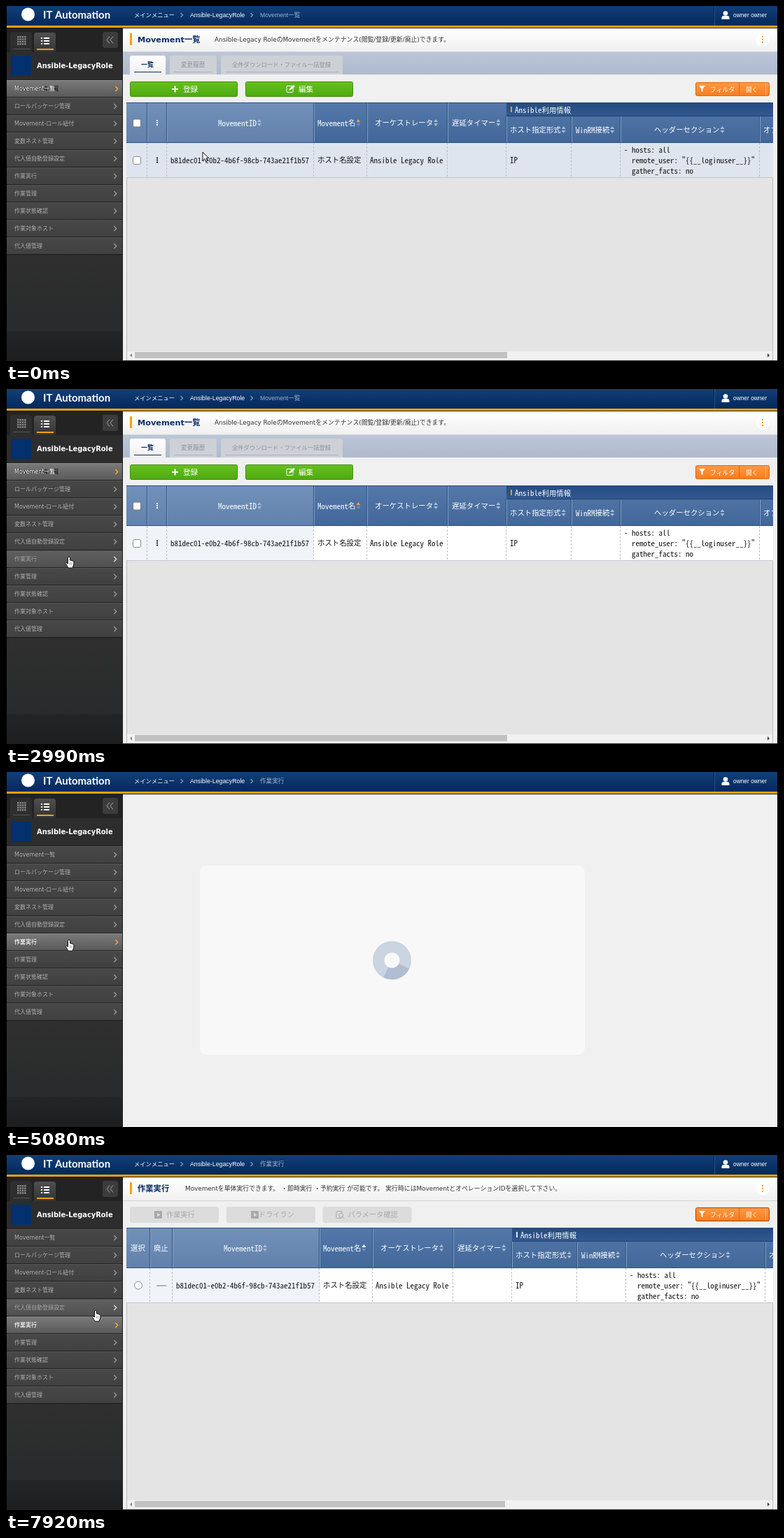
Animation, 1103 px wide and 508 px high, one loop 8 s. Source, as an HTML page with a canvas:

```html
<!DOCTYPE html>
<html lang="ja">
<head>
<meta charset="utf-8">
<title>IT Automation</title>
<style>
html, body { margin: 0; width: 100%; height: 100%; overflow: hidden; background: #000; }
canvas { display: block; }
</style>
</head>
<body>
<canvas id="stage" width="1103" height="508"></canvas>
<script>
const ctx = document.getElementById('stage').getContext('2d');
const LOOP = 8000;
const CJK = '"Noto Sans CJK JP", "Noto Sans CJK", sans-serif';
const UI = '"DejaVu Sans", ' + CJK;
const ARIAL = '"Liberation Sans", ' + CJK;
const MONO = '"Noto Sans Mono CJK JP", "Noto Sans CJK JP", monospace';
const MENU = ['Movement一覧', 'ロールパッケージ管理', 'Movement-ロール紐付', '変数ネスト管理', '代入値自動登録設定',
  '作業実行', '作業管理', '作業状態確認', '作業対象ホスト', '代入値管理'];

// Pointer path: time, x, y
const PATH = [[0, 281, 209], [70, 281, 209], [300, 150, 88], [530, 94, 186], [810, 94, 190], [880, 93, 194],
  [1050, 93, 209], [1610, 93, 209], [1890, 93, 229], [2290, 93, 229], [2360, 90, 240], [2659, 90, 240],
  [2660, 87, 232], [2989, 87, 232], [2990, 90, 240], [7800, 90, 240], [7920, 128, 222], [LOOP, 128, 222]];

function rect(x, y, w, h, fill) {
  ctx.fillStyle = fill;
  ctx.fillRect(x, y, w, h);
}

function box(x, y, w, h, r, fill, stroke) {
  ctx.beginPath();
  ctx.roundRect(x, y, w, h, r);
  paint(fill, stroke);
}

function circle(x, y, r, fill, stroke) {
  ctx.beginPath();
  ctx.arc(x, y, r, 0, 7);
  paint(fill, stroke);
}

function poly(x, y, points, fill, stroke, open) {
  ctx.beginPath();
  for (let i = 0; i < points.length; i += 2) ctx.lineTo(x + points[i], y + points[i + 1]);
  if (!open) ctx.closePath();
  paint(fill, stroke);
}

function paint(fill, stroke) {
  if (fill) { ctx.fillStyle = fill; ctx.fill(); }
  if (stroke) { ctx.strokeStyle = stroke; ctx.stroke(); }
}

function shade(y, h, ...colors) {
  const g = ctx.createLinearGradient(0, y, 0, y + h);
  colors.forEach((c, i) => g.addColorStop(i / (colors.length - 1), c));
  return g;
}

// y is the vertical middle of the glyphs
function text(s, x, y, size, color, family = UI, weight = 400) {
  ctx.font = `${weight} ${size}px ${family}`;
  ctx.fillStyle = color;
  ctx.fillText(s, x, y + size * 0.37);
}

// Fixed-pitch text whose kana and kanji are a little smaller than its Latin letters
function mono(s, x, y, color) {
  for (const run of s.match(/[ -~]+|[^ -~]+/g)) {
    text(run, x, y, run < '\x7f' ? 11 : 10.4, color, MONO);
    x += ctx.measureText(run).width;
  }
  return x;
}

function chevron(x, y, color, size = 3) {
  ctx.lineWidth = 1.4;
  poly(x, y, [-size / 2, -size, size / 2, 0, -size / 2, size], null, color, true);
  ctx.lineWidth = 1;
}

function dots(x, y, color, gap) {
  for (const i of [-1, 0, 1]) rect(x - 1, y - 1 + i * gap, 2, 2, color);
}

function header(page) {
  rect(1, 0, 1101, 28, shade(0, 28, '#123f78', '#03295c'));
  rect(1, 28, 1101, 3, '#f5a20a');
  rect(1, 31, 1101, 1, '#1c1c1c');
  circle(31.5, 12, 9.5, '#fff');
  text('IT Automation', 53, 12.5, 14.9, '#fff', 'Lato, sans-serif', 700);
  text('メインメニュー', 183, 13, 8.3, '#fff', CJK);
  chevron(251, 13, '#8298b6');
  text('Ansible-LegacyRole', 263, 13, 8.8, '#fff', ARIAL);
  chevron(351, 13, '#8298b6');
  text(page, 363, 13, 8.6, '#9fb0c8', ARIAL);
  rect(1011, 0, 1, 28, '#07224a');
  rect(1012, 0, 1, 28, '#2b5489');
  circle(1028, 10.5, 3.3, '#fff');
  box(1022.5, 14, 11, 5, [3, 3, 0, 0], '#fff');
  text('owner owner', 1039, 13, 8.4, '#fff', ARIAL);
}

function sidebar(active, hover) {
  rect(1, 32, 165, 476, '#2d2d2d');
  rect(1, 32, 165, 34, '#232323');
  rect(1, 357, 165, 108, shade(357, 108, '#2f2f2f', '#292a2b'));
  rect(1, 465, 165, 43, shade(465, 43, '#232527', '#1c1e20'));
  box(6, 37, 31, 29, [4, 4, 0, 0], '#2e2e2e');
  box(40, 38, 31, 28, [4, 4, 0, 0], shade(38, 28, '#505050', '#333'));
  box(138, 37, 22, 23, 3, '#3c3c3c');
  ctx.lineWidth = 1;
  for (let i = 0; i < 4; i++) for (let j = 0; j < 4; j++) rect(16 + i * 3.4, 43 + j * 3.4, 2.4, 2.4, '#8a8a8a');
  for (let i = 0; i < 3; i++) {
    rect(50, 45 + i * 4, 2, 2, '#fff');
    rect(54, 45 + i * 4, 8, 2, '#fff');
  }
  rect(10, 61, 24, 1, '#555');
  rect(44, 61, 24, 2, '#f5a20a');
  for (const x of [0, 5]) poly(144 + x, 48.5, [4, -5, 0, 0, 4, 5], null, '#aaa', true);
  rect(7, 71, 29, 29, '#03306e');
  text('Ansible-LegacyRole', 44, 85, 9.9, '#fff', UI, 700);

  MENU.forEach((name, i) => {
    const y = 106 + i * 25, on = i === active, over = i === hover;
    rect(1, y, 165, 25, on ? shade(y, 25, '#7b7b7b', '#585858')
      : over ? shade(y, 25, '#606060', '#505050') : shade(y, 25, '#484848', '#404040'));
    rect(1, y - 1, 165, 1, '#222');
    rect(1, y, 165, 1, on ? '#8a8a8a' : '#555');
    text(name, 12, y + 12.5, 8, '#222', UI, on ? 700 : 400);
    text(name, 12, y + 12, 8, on ? '#fff' : '#bdbdbd', UI, on && i ? 700 : 400);
    chevron(on ? 158 : 156, y + 12.5, on ? '#f5b02a' : over ? '#ddd' : '#999', 3.5);
  });
  rect(1, 355, 165, 1, '#1c1c1c');
  rect(166, 32, 1, 476, '#1c1c1c');
}

function titleBar(title, note, noteX) {
  rect(167, 32, 935, 33, shade(32, 33, '#fff', '#f0f0f0'));
  rect(167, 65, 935, 1, '#d4d4d4');
  rect(177, 39, 3, 17, '#f5a20a');
  text(title, 188, 47.5, 11.3, '#0a2d63', UI, 700);
  text(note, noteX, 47.5, 8.85, '#333');
  circle(1081, 48, 10, '#fff');
  dots(1081, 48, '#f0960a', 4);
}

function filterButton(y, edge) {
  box(985.5, y + 0.5, 105, 19, 2, shade(y, 20, '#ff9a45', '#f97c1c'), edge);
  rect(1047, y + 1, 1, 18, '#d96a14');
  rect(1085, y + 1, 1, 18, '#ffb070');
  poly(990, y + 5, [0, 0, 9, 0, 5.5, 4.5, 5.5, 9, 3.5, 8, 3.5, 4.5], '#fff');
  text('フィルタ', 1006, y + 10.5, 8.8, '#fff', CJK);
  text('開く', 1057, y + 10.5, 8.6, '#fff', CJK);
}

function tab(x, w, label, size, on) {
  box(x, 71, w, 27, [3, 3, 0, 0], on ? shade(71, 27, '#fff', '#f0f0f0') : '#cdd0d5');
  text(label, x + 16, 83.5, size, on ? '#0a2d63' : '#8d929b', CJK, on ? 700 : 400);
  rect(x + 6, 94, w - 12, 1, on ? '#0a2d63' : '#a9b2c2');
}

function greenButton(x, label) {
  box(x + 0.5, 108.5, 153, 21, 2, shade(108, 22, '#67c01f', '#4caa10'), '#3f8f0d');
  text(label, x + 76, 119.5, 10.6, '#fff', CJK);
}

function grayButton(x, label) {
  box(x, 74, 127, 23, 3, '#dcdcdc');
  text(label, x + (label.length > 5 ? 36 : label.length > 4 ? 46 : 52), 85.5, 10.2, '#a9a9a9', CJK);
  const ix = x + (label.length > 5 ? 19 : 35);
  if (label.length > 5) {
    box(ix + 0.5, 80.5, 8, 10, 1, null, '#a9a9a9');
    circle(ix + 7, 86, 3, '#dcdcdc', '#a9a9a9');
    poly(ix + 9, 88, [0, 0, 3, 3], null, '#a9a9a9', true);
  } else {
    box(ix, 80, 11, 11, 1, '#a9a9a9');
    poly(ix + 4, 82.5, [0, 0, 4.5, 3, 0, 6], '#dcdcdc');
  }
}

function sortIcon(x, y, up) {
  poly(x, y - 1, [-3, 0, 0, -4, 3, 0], up || '#a9bad2');
  poly(x, y + 1, [-3, 0, 0, 4, 3, 0], up ? '#7790b5' : '#a9bad2');
}

function panel(y) {
  rect(172, y, 924, 508 - y, '#e4e4e4');
  ctx.strokeStyle = '#bbb';
  ctx.strokeRect(172.5, y + 0.5, 923, 520);
}

function table(y, dx, selectable, hovered) {
  panel(y);
  ctx.save();
  ctx.beginPath();
  ctx.rect(172, y, 924, 508 - y);
  ctx.clip();
  const edges = [172, selectable ? 206 : 202, ...[230, 440, 516, 631, 715, 808, 878, 1077, 1180].map(x => x + dx)];
  const rowY = y + 58, mid = rowY + 24.5, lowMid = y + 39, headMid = y + 29;
  for (let i = 0; i < 10; i++) {
    const x = edges[i], w = edges[i + 1] - x, top = i > 5 ? y + 20 : y;
    rect(x, top, w, rowY - top, i < 3 ? shade(y, 58, '#7291b9', '#6181ac') : shade(y, 58, '#5478aa', '#426799'));
    rect(x, rowY, w, 49, hovered ? '#dfe5ee' : i < 3 ? '#f0f3f8' : '#fff');
    if (i) {
      rect(x - 1, top, 1, rowY - top, '#2f5285');
      rect(x, top, 1, rowY - top, '#86a1c4');
      ctx.setLineDash([3, 2]);
      poly(x - 0.5, rowY, [0, 0, 0, 49], null, '#b9bec6', true);
      ctx.setLineDash([]);
    }
  }
  rect(edges[6], y, 400, 20, shade(y, 20, '#244a80', '#335a90'));
  rect(edges[6], y + 19, 400, 1, '#1f3f70');
  rect(172, rowY - 1, 924, 1, '#2f5285');
  rect(172, rowY + 49, 924, 1, '#c2c6cc');
  rect(172, y, 924, 1, '#2b4c7c');

  rect(721 + dx, y + 6, 2, 8, selectable ? '#dfe7f2' : '#f5a20a');
  mono('Ansible利用情報', 727 + dx, y + 11, '#fff');
  const heads = [['MovementID', 303], ['Movement名', 445], ['オーケストレータ', 527], ['遅延タイマー', 637],
    ['ホスト指定形式', 720], ['WinRM接続', 814], ['ヘッダーセクション', 926], ['オプション', 1082]];
  heads.forEach(([label, x], i) => {
    const cy = i > 3 ? lowMid : headMid;
    const end = mono(label, x + dx, cy + 0.5, '#fff');
    sortIcon(end + 4, cy, i === 1 && (selectable ? '#fff' : '#ff9a45'));
  });

  if (selectable) {
    mono('選択', 178, headMid + 0.5, '#fff');
    mono('廃止', 211, headMid + 0.5, '#fff');
    circle(189, mid, 5.5, '#fff', '#888');
    rect(215, mid, 14, 1, '#777');
  } else {
    box(181.5, headMid - 5, 11, 11, 2, '#fff', '#777');
    box(181.5, mid - 5, 11, 11, 2, '#fff', '#888');
    dots(216, headMid, '#fff', 3);
    dots(216, mid, '#222', 3);
  }
  const cells = [['b81dec01-e0b2-4b6f-98cb-743ae21f1b57', 235], ['ホスト名設定', 445], ['Ansible Legacy Role', 520], ['IP', 720]];
  for (const [value, x] of cells) mono(value, x + dx, mid, '#111');
  ['- hosts: all', '  remote_user: "{{__loginuser__}}"', '  gather_facts: no']
    .forEach((line, i) => mono(line, 883 + dx, mid + (i - 1) * 15, '#111'));

  rect(173, 494, 922, 12, '#f1f1f1');
  rect(184, 495, selectable ? 529 : 532, 9, '#c1c1c1');
  poly(177, 500, [0, 0, 3, -3, 3, 3], '#888');
  poly(1091, 500, [0, 0, -3, -3, -3, 3], '#444');
  ctx.restore();
  rect(167, 507, 935, 1, '#333');
}

function listPage(hovered) {
  titleBar('Movement一覧', 'Ansible-Legacy RoleのMovementをメンテナンス(閲覧/登録/更新/廃止)できます。', 298);
  rect(167, 66, 935, 32, shade(66, 32, '#bcc6d7', '#aebacd'));
  tab(177, 51, '一覧', 9, true);
  tab(234, 67, '変更履歴', 8.6);
  tab(307, 174, '全件ダウンロード・ファイル一括登録', 8.3);
  greenButton(177, '登録');
  rect(237, 118, 9, 2, '#fff');
  rect(240.5, 114.5, 2, 9, '#fff');
  greenButton(342, '編集');
  box(401, 114.5, 9, 9, 1, null, '#fff');
  poly(404, 121, [0, 0, 1, -3, 7, -8, 9, -6, 3, -1], '#fff');
  filterButton(109, '#d96a14');
  table(138, 0, false, hovered);
}

function loadingCard(t) {
  box(277, 134, 550, 271, 10, '#f8f8f8');
  const turn = (Math.max(t, 3570) - 4060) / 1015;
  const angle = (turn - 0.05 * Math.sin(turn * 2 * Math.PI)) * 2 * Math.PI + 1.22;
  ctx.lineWidth = 16.5;
  for (const [from, to, color] of [[0, 7, '#cbd4e1'], [angle - 0.79, angle + 0.79, '#b1bdd1']]) {
    ctx.beginPath();
    ctx.arc(551.5, 269.5, 19.25, from, to);
    paint(null, color);
  }
  ctx.lineWidth = 1;
}

function runPage(t) {
  if (t >= 5410) {
    titleBar('作業実行', 'Movementを単体実行できます。 ・即時実行 ・予約実行 が可能です。 実行時にはMovementとオペレーションIDを選択して下さい。', 256);
  }
  if (t < 6270) return loadingCard(t);
  grayButton(177, '作業実行');
  grayButton(315, 'ドライラン');
  grayButton(452.5, 'パラメータ確認');
  filterButton(75, '#8f4a14');
  if (t >= 7200) return table(104, 8, true);
  panel(104);
  rect(167, 507, 935, 1, '#333');
}

function pointerAt(t) {
  const i = PATH.findIndex(p => p[0] > t);
  const [t0, x0, y0] = PATH[i - 1], [t1, x1, y1] = PATH[i];
  const k = (t - t0) / (t1 - t0);
  return [x0 + (x1 - x0) * k, y0 + (y1 - y0) * k];
}

function drawPointer(x, y, hand, dark) {
  ctx.lineJoin = 'round';
  if (hand) {
    poly(x, y, [-1.5, 1, 0, 0, 1.5, 1, 1.5, 5, 4, 5.5, 6.5, 6.5, 7, 8, 6.5, 12, 5, 16, -1, 16, -3, 12.5, -5, 9.5, -4, 8.5, -1.5, 10], '#fff', '#111');
    for (const dx of [1, 3.5]) rect(x + dx, y + 8, 0.7, 4, '#777');
  } else {
    poly(x, y, [0, 0, 0, 12, 2.8, 9.5, 4.7, 13.5, 6.7, 12.7, 5, 8.8, 8.6, 8.6], dark ? '#111' : '#fff', dark ? '#fff' : '#111');
  }
  ctx.lineJoin = 'miter';
}

function draw(t) {
  const running = t >= 3290;
  const [x, y] = pointerAt(t);
  const row = x < 166 ? Math.floor((y - 106) / 25) : -1;
  const waiting = (t >= 3570 && t < 3720) || (t >= 4060 && t < 4430);
  rect(0, 0, 1103, 508, '#000');
  rect(167, 32, 935, 476, '#f0f0f0');
  header(running ? '作業実行' : 'Movement一覧');
  sidebar(running ? 5 : 0, row);
  if (running) runPage(t);
  else listPage(x > 172 && y > 195 && y < 245);
  drawPointer(x, y, row >= 0 && !waiting, waiting);
}

const start = performance.now();
function tick() {
  draw((performance.now() - start) % LOOP);
  requestAnimationFrame(tick);
}
tick();
</script>
</body>
</html>
```
